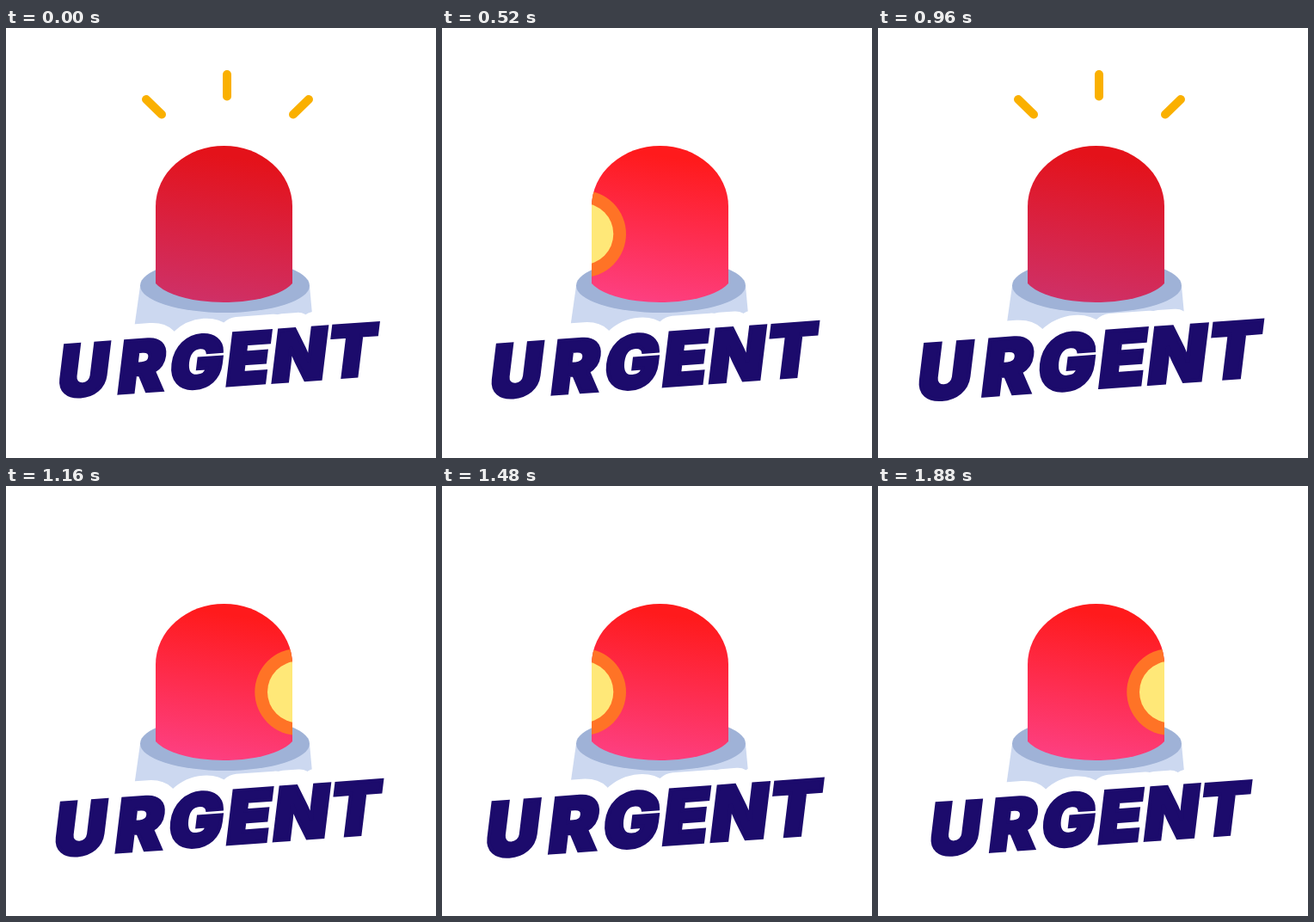
These frames come from a looping animation (500x500 px, 1920 ms). An HTML page with a canvas:

```html
<!DOCTYPE html>
<html lang="en">
<head>
<meta charset="utf-8">
<title>Urgent siren</title>
<style>
  html, body { margin: 0; width: 100%; height: 100%; overflow: hidden; background: #fff; }
  canvas { display: block; width: 500px; height: 500px; }
</style>
</head>
<body>
<canvas id="stage" width="500" height="500" aria-label="URGENT"></canvas>
<script>
const ctx = document.getElementById('stage').getContext('2d');
const STEP = 40, STEPS = 48;
const PULSE = 16, BLINK = 8;
const NAVY = '#1c0b6c';

// letter and its centre along the tilted line
const letters = [['U', -159], ['R', -90], ['G', -27.5], ['E', 33], ['N', 92.5], ['T', 154.5]];

const lamps = [
  { top: '#e4121a', bottom: '#cf3066' },
  { top: '#ff1a1c', bottom: '#fd3f80', x: 163.5 },
  { top: '#ff1a1c', bottom: '#fd3f80', x: 339.8 }
];

function disc(x, y, r, color) {
  ctx.fillStyle = color;
  ctx.beginPath();
  ctx.arc(x, y, r, 0, Math.PI * 2);
  ctx.fill();
}

function ray(x1, y1, x2, y2) {
  ctx.beginPath();
  ctx.moveTo(x1, y1);
  ctx.lineTo(x2, y2);
  ctx.stroke();
}

function drawRays() {
  ctx.strokeStyle = '#fab000';
  ctx.lineWidth = 10;
  ctx.lineCap = 'round';
  ray(257, 54, 257, 79.5);
  ray(163, 83, 181, 100.5);
  ray(352, 83, 334, 100.5);
}

function drawBase() {
  ctx.fillStyle = '#ccd8f0';
  ctx.beginPath();
  ctx.moveTo(156, 300);
  ctx.lineTo(147.5, 360);
  ctx.lineTo(358.5, 360);
  ctx.lineTo(353, 300);
  ctx.fill();
  ctx.fillStyle = '#9fb2d7';
  ctx.beginPath();
  ctx.ellipse(254.5, 299.5, 98.5, 31.5, 0, 0, Math.PI * 2);
  ctx.fill();
}

function drawDome(lamp) {
  const half = 79.5, foot = 84;
  const corner = Math.acos(half / foot);
  const paint = ctx.createLinearGradient(264, 150, 238, 318);
  paint.addColorStop(0, lamp.top);
  paint.addColorStop(1, lamp.bottom);
  ctx.save();
  ctx.beginPath();
  ctx.ellipse(253.5, 207.5, half, 70.5, 0, Math.PI, 0);
  ctx.ellipse(253.5, 286.5, foot, 32.5, 0, corner, Math.PI - corner);
  ctx.closePath();
  ctx.fillStyle = paint;
  ctx.fill();
  if (lamp.x) {
    ctx.clip();
    disc(lamp.x, 239.5, 50.5, '#ff7326');
    disc(lamp.x, 239.5, 35.8, '#ffe878');
  }
  ctx.restore();
}

function eachLetter(paint) {
  for (const [char, centre] of letters) {
    const box = ctx.measureText(char);
    const middle = (box.actualBoundingBoxRight - box.actualBoundingBoxLeft) / 2;
    paint(char, centre - middle);
  }
}

function drawWord(scale) {
  const baseline = 29.5;
  ctx.save();
  ctx.translate(249.5, 386.5);
  ctx.rotate(-4.1 * Math.PI / 180);
  ctx.scale(scale, scale);
  ctx.transform(1, 0, -0.195, 1, 0, 0);
  ctx.font = '900 82px Inter, Lato, sans-serif';
  ctx.textAlign = 'left';
  ctx.textBaseline = 'alphabetic';

  ctx.strokeStyle = '#fff';
  ctx.lineWidth = 38;
  ctx.lineJoin = 'round';
  eachLetter((char, x) => ctx.strokeText(char, x, baseline));

  ctx.strokeStyle = ctx.fillStyle = NAVY;
  ctx.lineWidth = 4;
  ctx.lineJoin = 'miter';
  ctx.miterLimit = 4;
  eachLetter((char, x) => {
    ctx.fillText(char, x, baseline);
    ctx.strokeText(char, x, baseline);
  });
  ctx.restore();
}

function draw(step) {
  ctx.fillStyle = '#fff';
  ctx.fillRect(0, 0, 500, 500);
  if (step % BLINK < BLINK / 2) drawRays();
  drawBase();
  drawDome(lamps[step % lamps.length]);
  drawWord(1.0385 - 0.0385 * Math.cos(step / PULSE * Math.PI * 2));
}

const start = performance.now();

function tick() {
  const time = performance.now() - start;
  draw(Math.floor(time / STEP) % STEPS);
  requestAnimationFrame(tick);
}

tick();
</script>
</body>
</html>
```
